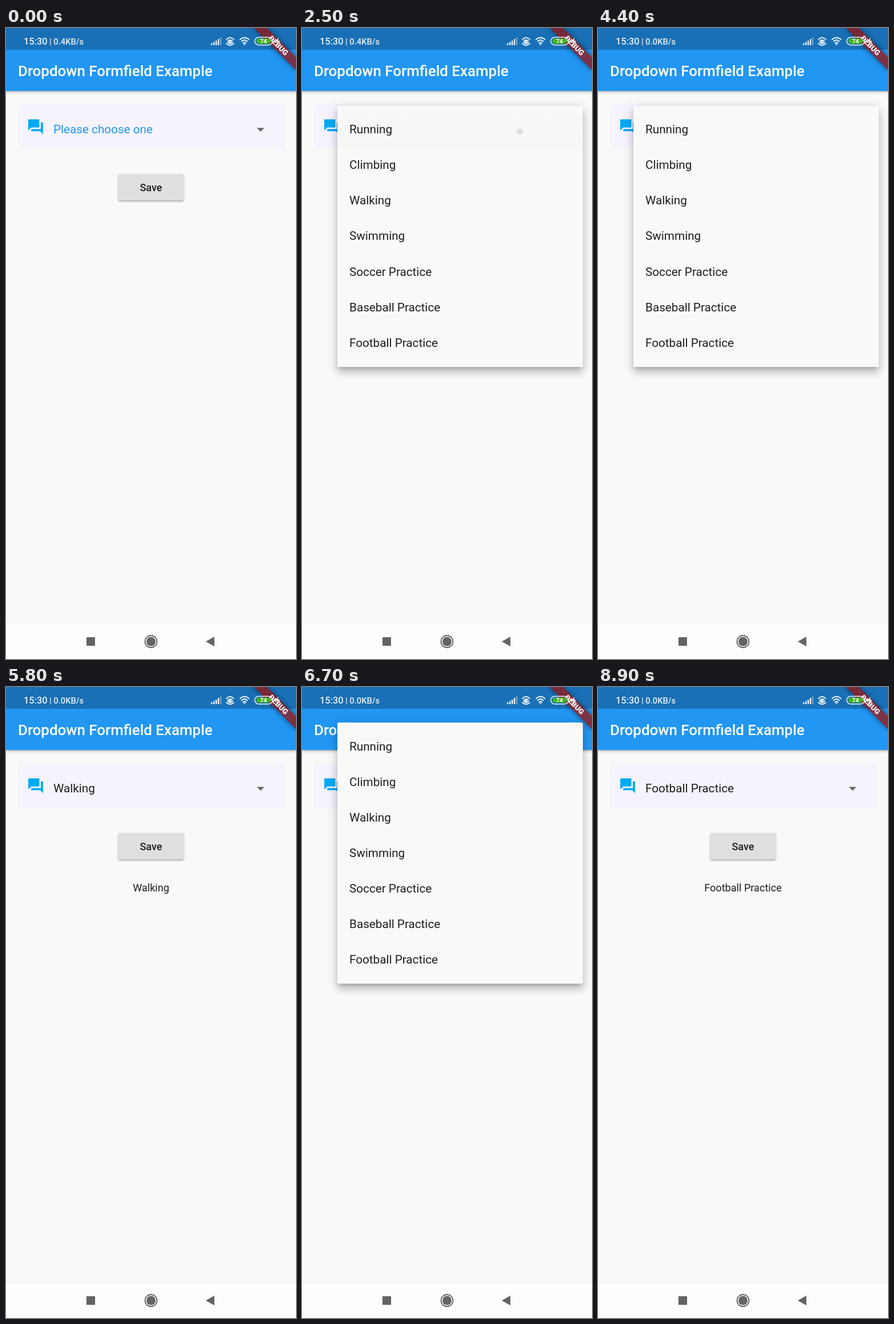
An HTML page that plays this animation: 508x1102 px, repeating every 9 s.

```html
<!DOCTYPE html>
<html lang="en">
<head>
<meta charset="utf-8">
<title>Dropdown Formfield Example</title>
<style>
html, body { margin: 0; width: 100%; height: 100%; overflow: hidden; background: #f9faf8; }
#stage {
  position: relative; width: 508px; height: 1102px; overflow: hidden;
  background: #f9faf8; color: #1d1e1d; font: 20.7px/30px Roboto, sans-serif;
}
#stage * { box-sizing: border-box; }
.abs, .menu, .item, .val, .out, .speed { position: absolute; white-space: nowrap; }
.bar {
  left: 0; top: 0; width: 508px; height: 110px;
  background: linear-gradient(#1970b6 38px, #2196f3 38px);
  box-shadow: 0 2px 5px rgba(0,0,0,.24), 0 1px 2px rgba(0,0,0,.14);
}
.title { left: 21px; top: 60px; color: #fff; font-size: 25.9px; font-weight: 500; }
.status { top: 9px; color: #e8f1f8; font-size: 14.7px; font-weight: 500; }
.field { left: 21px; top: 131px; width: 467px; height: 82px; border-radius: 5px 5px 0 0; background: #f6f3fc; }
.save {
  left: 197px; top: 255px; width: 114px; height: 46px; border-radius: 2.6px;
  background: #dee0de; font-size: 18.1px; font-weight: 500; line-height: 47px; text-align: center;
  box-shadow: 0 2px 3px rgba(0,0,0,.25), 0 1px 4px rgba(0,0,0,.12);
}
.val { left: 83px; top: 162px; }
.out { left: 0; width: 508px; top: 336px; text-align: center; font-size: 18.1px; }
.hint { color: #2196f3; }
.nav { left: 0; top: 1040px; width: 508px; height: 62px; background: #fdfefc; border-top: 1px solid #eef0ed; }
svg { position: absolute; left: 0; top: 0; }

.menu {
  left: 62px; width: 430px; height: 456px; overflow: hidden;
  border-radius: 2.6px; background: #f9faf8; opacity: 0;
  box-shadow: 0 6px 7px -4px rgba(0,0,0,.2), 0 10px 13px 1px rgba(0,0,0,.14), 0 4px 18px 3px rgba(0,0,0,.12);
}
.item { left: 21px; }
.glow { left: 0; top: 0; width: 430px; height: 72px; background: linear-gradient(#f9faf8, #f6f7f5); opacity: 0; }
.dot { left: 375.5px; top: 174.5px; width: 11px; height: 11px; border-radius: 50%; background: rgba(0,0,0,.09); opacity: 0; }

.pivot { left: 508px; top: 0; transform: rotate(45deg); transform-origin: 0 0; }
.debug {
  left: -51.8px; top: 36.3px; width: 103.6px; height: 15.5px;
  color: #fff; font-size: 13.2px; font-weight: 900; line-height: 15.5px; text-align: center;
  background: linear-gradient(#b71c1ca0, #b71c1ca0), rgba(0,0,0,.42);
  box-shadow: 0 0 10px rgba(0,0,0,.5);
}

/* one loop is 9 s, so 1% is 90 ms */
.menu, .item, .glow, .dot { animation: 9s linear infinite backwards; }
.val, .out, .speed { animation: 9s step-end infinite; opacity: 0; }
.first { top: 135.5px; animation-name: openFirst; }
.second { top: 62px; animation-name: openSecond; }
.item { animation-delay: calc(var(--i) * 15ms); }
.first .item { animation-name: showFirst; }
.second .item { animation-name: showSecond; }
.glow { animation-name: glow; }
.dot { animation-name: tap; }
.hint { animation-name: hint; }
.val.walk { animation-name: valWalk; }
.val.ball { animation-name: valBall; }
.out.walk { animation-name: outWalk; }
.out.ball { animation-name: outBall; }
.speed.a { animation-name: fast; }
.speed.b { animation-name: idle; }

@keyframes openFirst {
  0%, 24.2% { opacity: 0; height: 73px; }
  25% { opacity: 1; height: 73px; animation-timing-function: ease-out; }
  26% { opacity: 1; height: 456px; }
  51% { opacity: 1; height: 456px; }
  52%, 100% { opacity: 0; height: 456px; }
}
@keyframes openSecond {
  0%, 67.7% { opacity: 0; top: 135.5px; height: 83px; }
  68.5% { opacity: 1; top: 135.5px; height: 83px; animation-timing-function: ease-out; }
  69.5% { opacity: 1; top: 62px; height: 456px; }
  75.5% { opacity: 1; top: 62px; height: 456px; }
  76.5%, 100% { opacity: 0; top: 62px; height: 456px; }
}
@keyframes showFirst { 0%, 25.5% { opacity: 0; } 26.4%, 100% { opacity: 1; } }
@keyframes showSecond { 0%, 69% { opacity: 0; } 69.9%, 100% { opacity: 1; } }
@keyframes glow { 0%, 24.2% { opacity: 0; } 25%, 28.3% { opacity: 1; } 31%, 100% { opacity: 0; } }
@keyframes tap { 0%, 23.2% { opacity: 0; } 23.3%, 28.5% { opacity: 1; } 28.6%, 100% { opacity: 0; } }
@keyframes hint { 0% { opacity: 1; } 51% { opacity: 0; } }
@keyframes valWalk { 51% { opacity: 1; } 75.5% { opacity: 0; } }
@keyframes valBall { 75.5%, 100% { opacity: 1; } }
@keyframes outWalk { 58.8% { opacity: 1; } 81% { opacity: 0; } }
@keyframes outBall { 81%, 100% { opacity: 1; } }
@keyframes fast { 0% { opacity: 1; } 37.7% { opacity: 0; } }
@keyframes idle { 37.7%, 100% { opacity: 1; } }
</style>
</head>
<body>
<div id="stage">
  <div class="abs field"></div>
  <div class="val hint">Please choose one</div>
  <div class="val walk">Walking</div>
  <div class="val ball">Football Practice</div>
  <div class="abs save">Save</div>
  <div class="out walk">Walking</div>
  <div class="out ball">Football Practice</div>
  <div class="abs bar"></div>
  <div class="abs title">Dropdown Formfield Example</div>
  <div class="abs nav"></div>

  <svg width="508" height="1102" fill="#626462">
    <path transform="translate(36.4 157) scale(1.295)" fill="#03a9f4" d="M21 6h-2v9H6v2c0 .55.45 1 1 1h11l4 4V7c0-.55-.45-1-1-1zm-4 6V3c0-.55-.45-1-1-1H3c-.55 0-1 .45-1 1v14l4-4h10c.55 0 1-.45 1-1z"/>
    <path d="M439.5 174.5h13l-6.5 6.5z"/>
    <rect x="141" y="1064" width="15" height="15"/>
    <circle cx="254" cy="1071.5" r="8"/>
    <circle cx="254" cy="1071.5" r="10.5" fill="none" stroke="#626462" stroke-width="1.8"/>
    <path d="M350 1071.5l15-8.5v17z"/>
  </svg>

  <div class="menu first"><div class="abs glow"></div></div>
  <div class="menu second"></div>
  <div class="abs dot"></div>

  <div class="abs pivot"><div class="abs debug">DEBUG</div></div>

  <div class="abs status" style="left:31px;font-size:16.4px">15:30</div>
  <div class="speed a status" style="left:76px">| 0.4KB/s</div>
  <div class="speed b status" style="left:76px">| 0.0KB/s</div>
  <svg width="508" height="48" fill="none" stroke="#e8f1f8" stroke-width="1.8">
    <path stroke-width="2.4" d="M360.2 30v-3.5M364.2 30v-5.5M368.2 30v-8M372.2 30v-11"/>
    <path stroke-width="2.4" stroke-opacity=".4" d="M376.2 30v-14"/>
    <path d="M386 20q6.500-6.500 13 0M388.500 23q4-4 8 0M386 27q6.500 6.500 13 0M388.500 25q4 4 8 0" stroke-linecap="round"/>
    <circle cx="392.500" cy="24" r="1.300"/>
    <path stroke-width="2.1" d="M409.500 20.500q8.300-7.500 16.600 0M412.300 23.700q5.500-5 11 0M414.900 26.600q2.900-2.500 5.800 0"/>
    <path fill="#e8f1f8" stroke="none" d="M415.500 27.500h4.600l-2.300 2.700z"/>
    <rect x="435.800" y="16.300" width="31" height="13.400" rx="6.700" stroke-width="1.500"/>
    <rect x="438.500" y="18.500" width="25.500" height="9" rx="4.500" fill="#43b51c" stroke="none"/>
    <text x="451" y="27" fill="#fff" stroke="none" text-anchor="middle" font-family="Roboto, sans-serif" font-size="10.5" font-weight="700">74</text>
    <path fill="#f2f5f8" stroke="none" d="M477.500 16.500l-6 8h4l-1.500 6.500 6.500-8.500h-4z"/>
  </svg>
</div>
<script>
const names = ["Running", "Climbing", "Walking", "Swimming", "Soccer Practice", "Baseball Practice", "Football Practice"];
for (const menu of document.querySelectorAll(".menu")) {
  names.forEach((name, i) => {
    const item = document.createElement("div");
    item.className = "item";
    item.textContent = name;
    item.style.top = 26.5 + i * 62.15 + "px";
    item.style.setProperty("--i", i);
    menu.append(item);
  });
}
</script>
</body>
</html>
```
